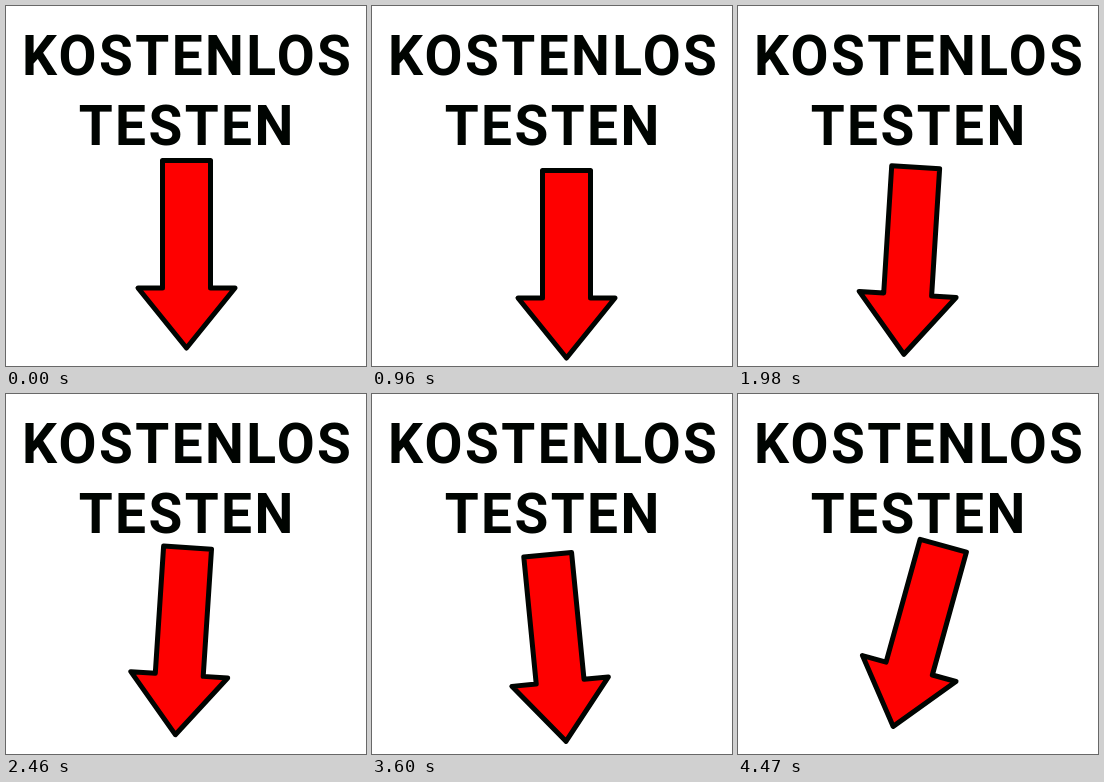
An HTML page for the animation above (4500 ms loop, 360x360 px).

```html
<!DOCTYPE html>
<html lang="de">
<head>
<meta charset="utf-8">
<style>
  html, body { margin: 0; width: 100%; height: 100%; overflow: hidden; background: #fff; }
  svg { display: block; width: 100%; height: 100%; }
  text { font: 700 55px Roboto, sans-serif; letter-spacing: 2.4px; text-anchor: middle; fill: #000401; }
  #arrow { fill: #fe0000; stroke: #000401; stroke-width: 5; stroke-linejoin: round; }
</style>
</head>
<body>
<svg viewBox="0 0 360 360">
  <text x="181.7" y="69">KOSTENLOS</text>
  <text x="181.2" y="139">TESTEN</text>
  <path id="arrow" d="M-24-93.5H24V34H48.5L0 94-48.5 34H-24Z"/>
</svg>
<script>
const LOOP = 4500, STEP = 30;
const REST_X = 180.5, REST_Y = 248;
const arrow = document.getElementById('arrow');

// Turning points of the wobble: time, offset from rest, tilt in degrees
const keys = [
  { t: 0, x: 0, y: 0, tilt: 0 },
  { t: 960, x: 14, y: 10, tilt: 0 },
  { t: 1500, x: -1.5, y: 15, tilt: 14.6 },
  { t: 1980, x: -8.7, y: 6.5, tilt: 3.6 },
  { t: 2970, x: -1, y: -9.5, tilt: 3.9 },
  { t: 3600, x: 4.3, y: 5.8, tilt: -5.6 },
  { t: 4470, x: -0.2, y: -6.2, tilt: 15.5 }
];

const ease = u => (1 - Math.cos(Math.PI * u)) / 2;

function draw() {
  const t = Math.floor(performance.now() % LOOP / STEP) * STEP;
  const next = Math.max(1, keys.findIndex(key => key.t >= t));
  const a = keys[next - 1], b = keys[next];
  const u = ease((t - a.t) / (b.t - a.t));
  const mix = name => a[name] + (b[name] - a[name]) * u;
  arrow.setAttribute('transform',
    `translate(${REST_X + mix('x')} ${REST_Y + mix('y')}) rotate(${mix('tilt')})`);
  requestAnimationFrame(draw);
}
draw();
</script>
</body>
</html>
```
